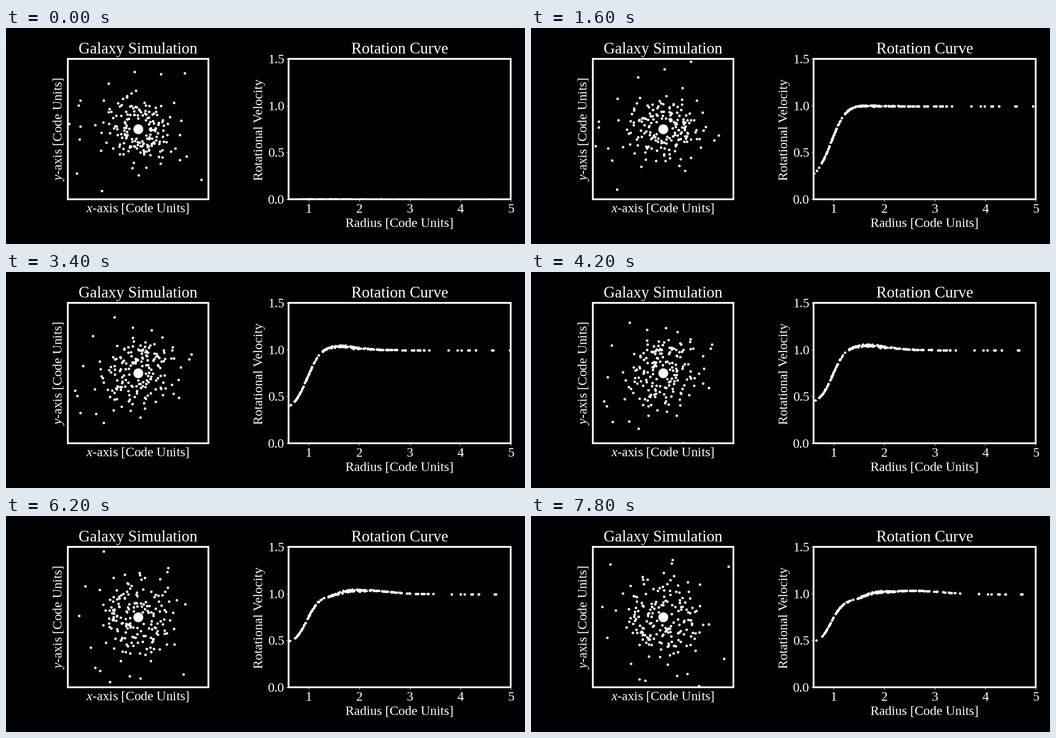
A matplotlib script that plays this animation: 1159x483 px, repeating every 8 s.

```python
import numpy as np
import matplotlib.pyplot as plt
from matplotlib.animation import FuncAnimation

W, H, FRAMES, DT = 1159, 483, 40, 0.2
TOP, BOTTOM = 69, 383
CX, CY, SCALE = 295, 226, 31.4       # galaxy centre, pixels per code unit
TITLE, TEXT = 35.3, 29.4             # font sizes in pixels

plt.rcParams.update({
    "font.family": "Liberation Serif",
    "mathtext.fontset": "custom",
    "mathtext.it": "Liberation Serif:italic",
    "mathtext.rm": "Liberation Serif",
    "text.color": "white",
})

# The farthest stars, in stage pixels; all others are random.
FAR = np.array([(399, 101), (346, 103), (287, 98), (229, 124), (166, 162),
                (162, 173), (141, 214), (166, 220), (164, 249), (158, 325),
                (214, 364), (436, 339), (403, 287)])

rng = np.random.default_rng(12)
dx, dy = FAR[:, 0] - CX, CY - FAR[:, 1]
disc = np.concatenate([rng.triangular(0.6, 1.15, 2.1, 125),
                       rng.triangular(1.9, 2.1, 3.8, 47)])
r0 = np.concatenate([np.hypot(dx, dy) / SCALE, disc])
theta0 = np.concatenate([np.arctan2(dy, dx),
                         rng.uniform(0, 2 * np.pi, disc.size)])
jitter = rng.normal(0, 0.007, r0.size)


def logistic(x):
    return 1 / (1 + np.exp(-x))


def bump(r, centre, width):
    return np.exp(-((r - centre) / width) ** 2)


def ease(n, start, end):
    x = np.clip((n - start) / (end - start), 0, 1)
    return x * x * (3 - 2 * x)


def radius(n):
    """Outer stars drift outward, the innermost sink."""
    drift = (0.036 * logistic((r0 - 1.15) / 0.09)
             - 0.005 * logistic((0.8 - r0) / 0.02))
    swing = 0.1 * np.sin(np.pi * n / 43) * bump(r0, 0.9, 0.35)
    return np.sqrt(r0 ** 2 + drift * n) - swing


def speed(r, n):
    """Flat curve with a rising core, a late dip and an outgoing crest."""
    x = np.minimum(r, 3) - 1
    base = 0.995 * logistic(0.754 + 6.2 * x + 4 * x ** 2)
    core = 0.245 * ease(n, 4, 27) * np.exp(-np.maximum(r - 0.6, 0) / 0.42)
    crest = 0.035 * ease(n, 4, 21) * bump(r, 1.4 + 0.0008 * n ** 2,
                                          0.35 + 0.01 * n)
    dip = 0.08 * ease(n, 20, 39) * bump(r, 1.35, 0.3)
    scatter = jitter * min(n / 20, 1) * bump(r, 1.7, 0.5)
    return base + core + crest - dip + scatter


radii = np.array([radius(n) for n in range(FRAMES)])
speeds = np.array([speed(r, n) for n, r in enumerate(radii)])
turn = np.cumsum(DT * speeds / radii, axis=0)
angles = theta0 + np.vstack([np.zeros(r0.size), turn[:-1]])
speeds[0] = 0

# At 72 dpi one point is one pixel.
fig = plt.figure(figsize=((W + 0.01) / 72, (H + 0.01) / 72), dpi=72,
                 facecolor="black")


def panel(left, right, xlim, ylim):
    ax = fig.add_axes([left / W, 1 - BOTTOM / H,
                       (right - left) / W, (BOTTOM - TOP) / H],
                      facecolor="black")
    ax.set(xlim=xlim, ylim=ylim, xticks=[], yticks=[])
    for side in ax.spines.values():
        side.set(color="white", linewidth=4)
    return ax


def label(x, y, text, size=TEXT, ha="center", rotation=0):
    fig.text(x / W, 1 - y / H, text, fontsize=size, ha=ha, va="baseline",
             rotation=rotation, rotation_mode="anchor")


sky = panel(138, 452, (-5, 5), (-5, 5))
curve = panel(631, 1127, (0.6, 5), (0, 1.5))
curve.set(xticks=range(1, 6), yticks=[0, 0.5, 1, 1.5])
curve.tick_params(color="white", length=5, width=1,
                  labelbottom=False, labelleft=False)

label(295, 57, "Galaxy Simulation", TITLE)
label(879.5, 57, "Rotation Curve", TITLE)
label(294.5, 411.5, "$x$-axis [Code Units]")
label(124.5, 227, "$y$-axis [Code Units]", rotation=90)
label(879, 444.5, "Radius [Code Units]")
label(572.5, 227, "Rotational Velocity", rotation=90)
for k in range(1, 6):
    label(1127 - (5 - k) * 496 / 4.4, 413, str(k))
for k in range(4):
    label(622, 392.5 - k * 104.5, f"{k / 2:.1f}", ha="right")

dot = dict(ls="", marker="o", color="white", markeredgewidth=0)
sky.plot([0], [0], markersize=22, **dot)
stars, = sky.plot([], [], markersize=5.7, **dot)
points, = curve.plot([], [], markersize=5.7, **dot)


def draw(n):
    r, a = radii[n], angles[n]
    stars.set_data(r * np.cos(a), r * np.sin(a))
    points.set_data(r, speeds[n])
    return stars, points


anim = FuncAnimation(fig, draw, frames=FRAMES, interval=200,
                     repeat=True, repeat_delay=0, blit=False)
plt.show()
```
